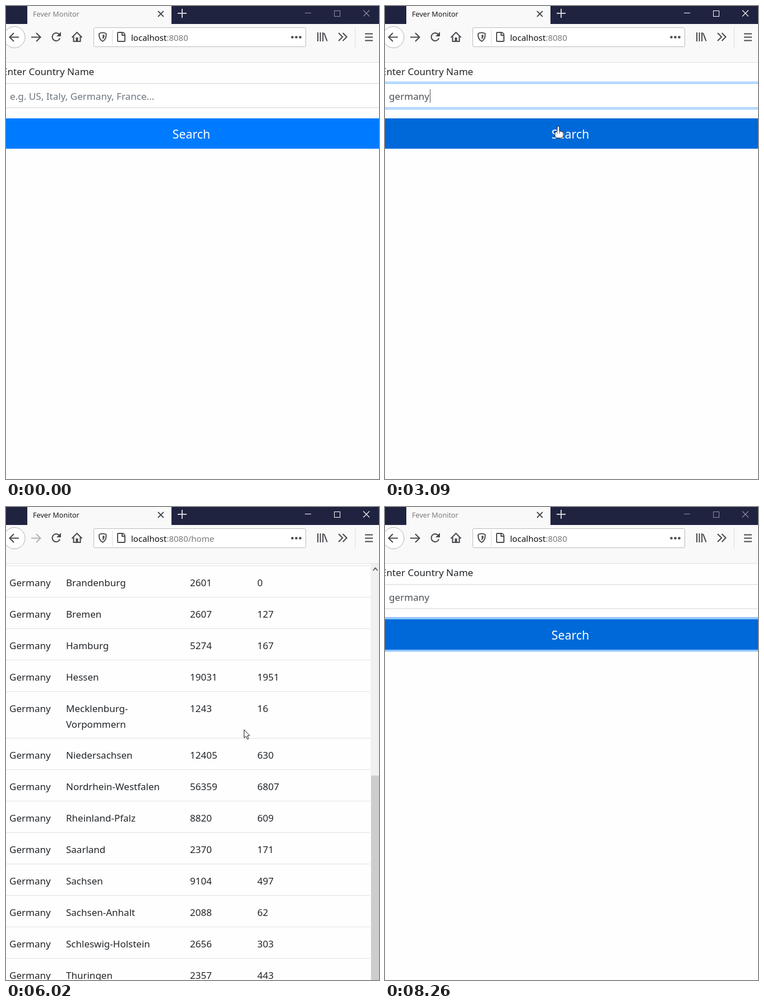
Recreate the animation shown at these times as an HTML page with a canvas. Size 665 px wide and 842 px high, loop 8.34 s.

```html
<!DOCTYPE html>
<html lang="en">
<head>
<meta charset="utf-8">
<title>Fever Monitor</title>
<style>
html, body { margin: 0; width: 100%; height: 100%; overflow: hidden; background: #fefefe; }
canvas { display: block; }
</style>
</head>
<body>
<canvas id="stage" width="665" height="842"></canvas>
<script>
const W = 665, H = 842, LOOP = 8340, STEP = 77.2;
const ctx = document.getElementById('stage').getContext('2d');

const INK = '#212529', ICON = '#4a4a4f', FADED = '#b4b4b6', JUMBO = '#e9ecef';
const PAGE_TOP = 101, RIGHT = 649, BAR_Y = 55.5;

const ROWS = `Baden-Wurttemberg 29011 1720
Bayern 34293 4958
Berlin 13282 579
Brandenburg 2601 0
Bremen 2607 127
Hamburg 5274 167
Hessen 19031 1951
Mecklenburg-|Vorpommern 1243 16
Niedersachsen 12405 630
Nordrhein-Westfalen 56359 6807
Rheinland-Pfalz 8820 609
Saarland 2370 171
Sachsen 9104 497
Sachsen-Anhalt 2088 62
Schleswig-Holstein 2656 303
Thuringen 2357 443`.split('\n').map(line => line.split(' '));
const HISTORY = ['Germany', 'germany', 'Italy', 'France', 'US', 'Spain'];

const T = {
  enter: 230, focus: 1300, list: 1460, type: 1845, key: 150, listEnd: 2900, press: 3540,
  home: 3850, burst: 3930, loaded: 4380, ready: 4770, back: 7400, gone: 8100, blur: 8250
};

// Each glide: from time, to time, then where it ends
const POINTER_START = { x: 640, y: 712 };
const GLIDES = [
  [T.enter, 1150, 199, 171], [2850, 3550, 400, 250], [3700, 4090, 437, 347],
  [4780, 5320, 413, 358], [5700, 6020, 424, 396], [6250, 6710, 411, 399],
  [6720, 7100, 120, 355], [7250, 7720, 661, 836]
];

const between = (t, a, b) => t >= a && t < b;
const progress = (t, a, b) => Math.min(1, Math.max(0, (t - a) / (b - a)));
const easeOut = p => p * (2 - p);
const easeInOut = p => p * p * (3 - 2 * p);

function pointerAt(t) {
  return GLIDES.reduce((pos, [a, b, x, y]) => {
    const p = easeOut(progress(t, a, b));
    return { x: pos.x + (x - pos.x) * p, y: pos.y + (y - pos.y) * p };
  }, POINTER_START);
}

function scrollAt(t) {
  const glide = (a, b) => easeInOut(progress(t, a, b));
  return Math.round(312 * glide(5090, 5550) + 322 * glide(5690, 6020) - 634 * glide(6250, 6903));
}

function rect(x, y, w, h, color) {
  ctx.fillStyle = color;
  ctx.fillRect(x, y, w, h);
}

function round(x, y, w, h, r, fill, stroke) {
  ctx.beginPath();
  ctx.roundRect(x, y, w, h, r);
  paint(fill, stroke);
}

function disc(x, y, r, fill, stroke) {
  ctx.beginPath();
  ctx.arc(x, y, r, 0, 2 * Math.PI);
  paint(fill, stroke);
}

function paint(fill, stroke) {
  if (fill) { ctx.fillStyle = fill; ctx.fill(); }
  if (stroke) { ctx.strokeStyle = stroke; ctx.stroke(); }
}

function setFont(size, weight) {
  ctx.font = `${weight} ${size}px "Noto Sans", "Open Sans", sans-serif`;
}

function text(str, x, y, size = 17, color = INK, weight = 400) {
  setFont(size, weight);
  ctx.fillStyle = color;
  ctx.fillText(str, x, y);
  return ctx.measureText(str).width;
}

function line(color, width, ...xy) {
  ctx.beginPath();
  for (let i = 0; i < xy.length; i += 2) ctx.lineTo(xy[i], xy[i + 1]);
  ctx.strokeStyle = color;
  ctx.lineWidth = width;
  ctx.stroke();
  ctx.lineWidth = 1;
}

function cross(x, y, r, color, width) {
  line(color, width, x - r, y - r, x + r, y + r);
  line(color, width, x - r, y + r, x + r, y - r);
}

// Tip at x, y; arms reach back by dx and dy to both sides
function chevron(x, y, dx, dy, color, width = 2.1) {
  if (Math.abs(dx) < 9 && dy > 0) line(color, width, x - dx, y - dy, x, y, x - dx, y + dy);
}

function titleBar(t) {
  const active = between(t, T.focus, T.blur);
  rect(0, 0, W, 32, '#202340');
  rect(38, 0, 257, 32, '#f9f9fa');
  if (between(t, T.burst, T.loaded)) {
    const p = progress(t, T.burst, T.loaded);
    ctx.save();
    ctx.beginPath();
    ctx.rect(38, 0, 257, 32);
    ctx.clip();
    ctx.globalAlpha = Math.min(1, (1 - p) / 0.6);
    disc(58, 14, 6 + 38 * p, '#99cbfd');
    ctx.restore();
  }
  text('Fever Monitor', 48, 19, 12.6, active ? '#18181a' : '#7b7b7d');
  cross(276, 14, 5, ICON, 1.8);
  rect(306, 12, 16, 2, '#d0d0d6');
  rect(313, 5, 2, 16, '#d0d0d6');
  const color = active ? '#ffffff' : '#8e8f9d';
  rect(533, 12, 11, 1, color);
  ctx.strokeStyle = color;
  ctx.strokeRect(585.5, 8.5, 10, 10);
  cross(642.5, 13, 5.5, color, 1.1);
}

function arrow(x, dir, color) {
  rect(x - 8, BAR_Y - 1, 16, 2, color);
  chevron(x + 8.5 * dir, BAR_Y, 7.5 * dir, 7.5, color);
}

function reload(color) {
  ctx.beginPath();
  ctx.arc(89.5, 55, 7, 0.35, 5.5);
  ctx.lineWidth = 2.1;
  paint(null, color);
  ctx.lineWidth = 1;
  ctx.beginPath();
  ctx.moveTo(98, 46);
  ctx.lineTo(98, 54);
  ctx.lineTo(90, 54);
  paint(color);
}

function house() {
  line(ICON, 2.1, 117.5, 56, 126.5, 47, 135.5, 56);
  line(ICON, 2.1, 120.5, 54, 120.5, 63, 132.5, 63, 132.5, 54);
  rect(124.5, 56, 4, 7, ICON);
}

function shield(x, y) {
  ctx.lineWidth = 1.9;
  ctx.beginPath();
  ctx.moveTo(x - 6.3, y - 6);
  ctx.quadraticCurveTo(x, y - 9, x + 6.3, y - 6);
  ctx.quadraticCurveTo(x + 7, y + 4, x, y + 8);
  ctx.quadraticCurveTo(x - 7, y + 4, x - 6.3, y - 6);
  paint(null, ICON);
  ctx.lineWidth = 1;
  ctx.beginPath();
  ctx.moveTo(x, y - 4);
  ctx.lineTo(x + 3.3, y - 3.5);
  ctx.quadraticCurveTo(x + 3.7, y + 2, x, y + 4.5);
  paint(ICON);
}

function toolbar(t, home) {
  rect(0, 32, W, 68, '#f9f9fa');
  rect(0, 100, W, 1, '#e0e0e1');

  disc(15, BAR_Y, 19, '#ffffff', '#b0b0b2');
  arrow(15, -1, ICON);
  arrow(53, 1, between(t, T.press, T.back) ? FADED : ICON);
  if (between(t, T.press, T.loaded)) cross(90, BAR_Y, 7.5, FADED, 2.1);
  else reload(between(t, T.loaded, T.ready) ? FADED : ICON);
  house();

  round(156.5, 38.5, 378, 34, 2, '#ffffff', '#bcbcbe');
  shield(172.3, 55);
  rect(189, 42, 1, 27, '#dcdcde');
  ctx.lineWidth = 1.9;
  round(199, 47, 13, 16, [1, 5, 1, 1], null, ICON);
  line(ICON, 1.9, 207, 47, 207, 52, 212, 52);
  const w = text('localhost', 223, 62, 15, '#0c0c0d');
  text(home ? ':8080/home' : ':8080', 223 + w, 62, 15, '#7a7a7c');

  for (let i = 0; i < 3; i++) {
    disc(510.5 + 7 * i, BAR_Y, 2.3, ICON);
    rect(555 + 4.5 * i, 47, 2, 16, ICON);
    rect(640, 48.5 + 6 * i, 14, 2, ICON);
  }
  line(ICON, 2.1, 567, 48, 572.5, 62.5);
  chevron(600, 55, 7, 7, ICON);
  chevron(607.5, 55, 7, 7, ICON);
  rect(622, 37, 1, 37, '#dcdcde');
}

function overSearch(t) {
  return t >= T.enter && between(pointerAt(t).y, 200, 254) ? 1 : 0;
}

function inputBox(t, value) {
  const focused = between(t, T.focus, T.press);
  const border = focused ? '#80bdff' : '#ced4da';
  if (focused) rect(0, 134, W, 51, '#bfdeff');
  rect(0, 138, W, 43, '#ffffff');
  rect(0, 137.5, W, 1, border);
  rect(0, 180.5, W, 1, border);
  const w = value ? text(value, 7, 167, 17.1, '#495057') : 0;
  if (!value) text('e.g. US, Italy, Germany, France...', 7, 167, 17.1, '#6c757d');
  if (focused) rect(Math.round(8 + w), 148, 1, 24, '#495057');
}

function suggestions(items) {
  const pitch = 22.8;
  ctx.save();
  ctx.shadowColor = 'rgba(0, 0, 0, 0.45)';
  ctx.shadowBlur = 4;
  ctx.shadowOffsetY = 1;
  rect(-5, 181, W + 10, items.length * pitch + 1, '#ffffff');
  ctx.restore();
  rect(0, 180.5, W, 1, '#b8b8b8');
  items.forEach((s, i) => text(s, -1, 199 + i * pitch, 12.7, '#111111'));
}

function formPage(t) {
  const pressed = t >= T.press;
  const typed = Math.max(0, Math.floor((t - T.type) / T.key) + 1);
  const value = 'germany'.slice(0, typed);

  text('Enter Country Name', -7, 123, 17.1);
  inputBox(t, value);

  if (pressed) rect(0, 196, W, 61.5, '#8fc6fb');
  const mix = pressed ? 1 : (overSearch(t) + overSearch(t - STEP)) / 2;
  rect(0, 200, W, 54, `rgb(0, ${123 - 18 * mix}, ${255 - 38 * mix})`);
  ctx.textAlign = 'center';
  text('Search', 330.5, 236, 21.3, '#ffffff');
  ctx.textAlign = 'left';

  if (between(t, T.list, T.listEnd)) suggestions(value ? HISTORY.slice(0, 2) : HISTORY);
}

// Light weight: the outline is trimmed with the background colour
function total(str) {
  ctx.save();
  ctx.letterSpacing = '-5.6px';
  ctx.lineJoin = 'round';
  ctx.lineWidth = 2;
  ctx.strokeStyle = JUMBO;
  text(str, 26, 241, 67);
  ctx.strokeText(str, 26, 241);
  ctx.restore();
}

function cell(str, x, y, weight) {
  str.split('|').forEach((part, i) => text(part, x, y + i * 27.6, 17, INK, weight));
}

function table() {
  const columns = [6, 107, 328, 448];
  const row = (cells, y, weight) => {
    rect(0, y, RIGHT, 1, '#dee2e6');
    cells.forEach((s, i) => cell(s, columns[i], y + 37, weight));
    return y + (cells.some(s => s.includes('|')) ? 83 : 56);
  };
  let y = row(['Country', 'State', 'Active|Cases', 'New cases since|yesterday'], 487, 700);
  for (const cells of ROWS) y = row(['Germany', ...cells], y, 400);
}

function homePage(t) {
  const scroll = scrollAt(t);
  ctx.save();
  ctx.beginPath();
  ctx.rect(0, PAGE_TOP, W, H - PAGE_TOP);
  ctx.clip();
  ctx.translate(0, -scroll);

  round(-20, 100, RIGHT + 20, 350, 5, JUMBO);
  total('213 650');
  text('Currently total active cases', 29, 282, 17.1);
  const { x, y } = pointerAt(t);
  const hover = between(x, 29, 216) && between(y + scroll, 333, 377);
  round(29, 333.5, 187, 43, 4, hover ? '#0069d9' : '#007bff');
  text('Try another country', 44, 363, 17.1, '#ffffff');
  table();
  ctx.restore();

  rect(650, PAGE_TOP, 15, H - PAGE_TOP, '#f0f0f0');
  rect(651, Math.round(121 + scroll * 0.5625), 14, 433, '#cdcdcd');
  line('#505050', 1.8, 654.5, 113, 658.5, 108.5, 662.5, 113);
}

function textCursor(x, y) {
  rect(x - 0.5, y - 7, 1.2, 14, '#222222');
  for (const end of [-8, 7]) rect(x - 3.5, y + end, 7, 1.2, '#222222');
}

function handCursor(x, y) {
  round(x - 6, y + 9, 15, 12, 4, '#ffffff', '#1a1a1a');
  round(x - 2, y, 4, 14, 2, '#ffffff', '#1a1a1a');
  rect(x - 1.5, y + 8, 3, 8, '#ffffff');
}

function arrowCursor(x, y) {
  const outline = [[0, 0], [0, 14.5], [3.3, 11.5], [5.7, 17], [8, 16], [5.7, 10.7], [10, 10.5]];
  ctx.beginPath();
  for (const [dx, dy] of outline) ctx.lineTo(x + 0.5 + dx, y + 0.5 + dy);
  ctx.closePath();
  paint('#ffffff', '#1a1a1a');
}

function pointer(t, home) {
  if (!between(t, T.enter, T.gone)) return;
  const pos = pointerAt(t);
  const x = Math.round(pos.x), y = Math.round(pos.y);
  if (!home && between(y, 139, 181)) textCursor(x, y);
  else if (!home && overSearch(t)) handCursor(x, y);
  else arrowCursor(x, y);
}

function draw(now) {
  const tick = Math.floor((now % LOOP + 11) / STEP);
  const t = Math.floor(tick * STEP / 10) * 10;
  const home = between(t, T.home, T.back);
  rect(0, 0, W, H, '#fefefe');
  if (home) homePage(t);
  else formPage(t);
  titleBar(t);
  toolbar(t, home);
  pointer(t, home);
}

const start = performance.now();
function loop() {
  draw(performance.now() - start);
  requestAnimationFrame(loop);
}
loop();
</script>
</body>
</html>
```
